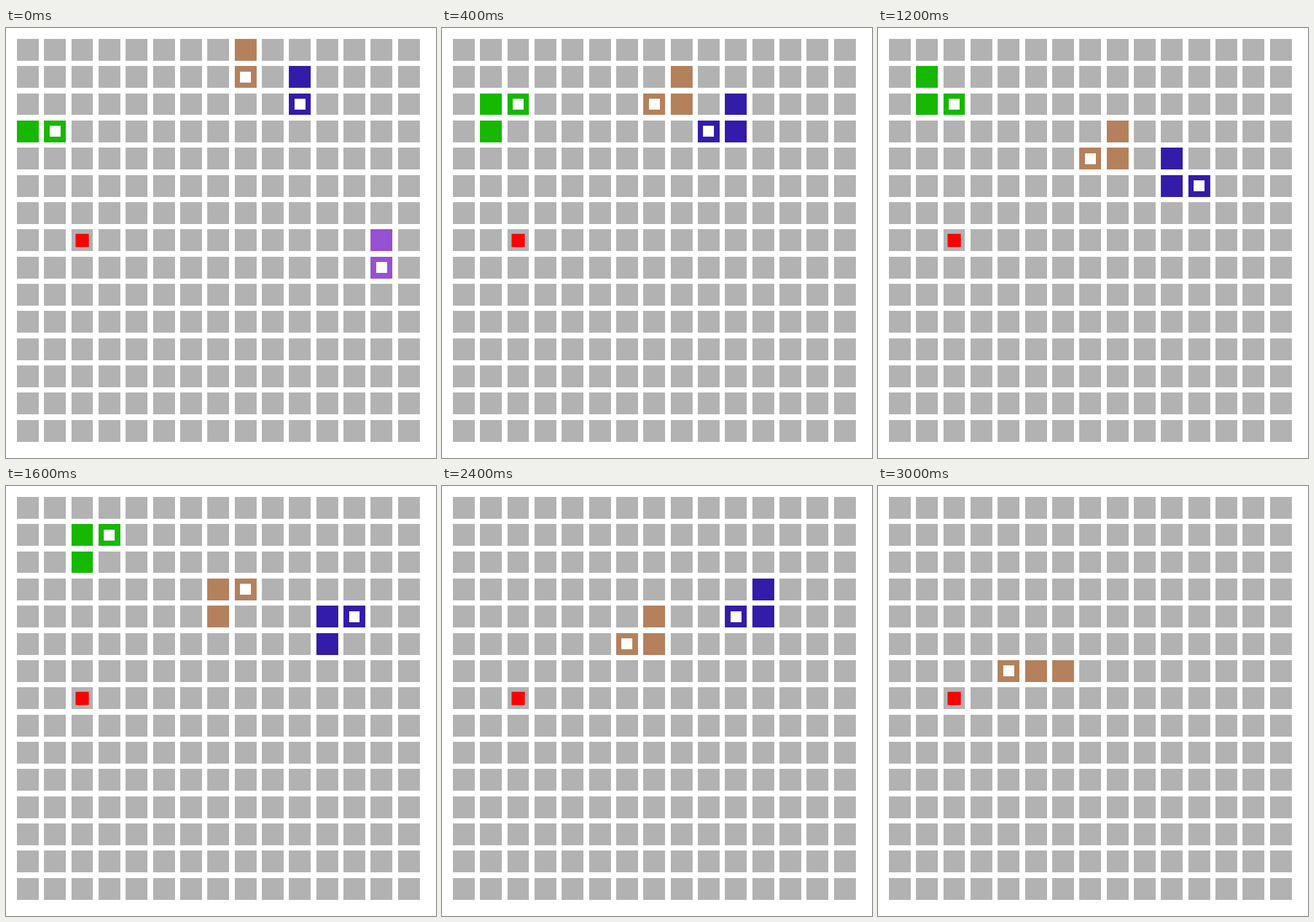
Animation of 748 by 748 pixels, one loop 3.2 s. Source, as an HTML page with a canvas:

```html
<!DOCTYPE html>
<html lang="en">
<head>
<meta charset="utf-8">
<title>Grid snakes</title>
<style>
  html, body { margin: 0; width: 100%; height: 100%; overflow: hidden; background: #fff; }
  canvas { display: block; }
</style>
</head>
<body>
<canvas id="stage" width="748" height="748"></canvas>
<script>
const ctx = document.getElementById('stage').getContext('2d');
const SIZE = 748, CELLS = 15, STEP = 200, STEPS = 16, LENGTH = 3;
const UNIT = SIZE / 79;
const FOOD = [2, 7];
const DIRS = { U: [0, -1], D: [0, 1], L: [-1, 0], R: [1, 0] };

// A snake leaves the board once its moves run out.
const snakes = [
  { color: '#16b800', start: [0, 3], moves: 'RURULDRURUR' },
  { color: '#b4815c', start: [8, 0], moves: 'DDLDRDLURDLDLDLL' },
  { color: '#331caa', start: [10, 1], moves: 'DDLDRDRURULDLDR' },
  { color: '#9751d3', start: [13, 7], moves: 'DR' }
];

for (const snake of snakes) {
  snake.path = [snake.start];
  for (const move of snake.moves) {
    const [x, y] = snake.path[snake.path.length - 1];
    const [dx, dy] = DIRS[move];
    snake.path.push([x + dx, y + dy]);
  }
}

// Square centred in a cell, side given in grid units, snapped to whole pixels.
function square([col, row], side, color) {
  const inset = (4 - side) / 2;
  const edge = n => Math.round((2 + 5 * n + inset) * UNIT);
  const end = n => Math.round((2 + 5 * n + inset + side) * UNIT);
  const x = edge(col), y = edge(row);
  ctx.fillStyle = color;
  ctx.fillRect(x, y, end(col) - x, end(row) - y);
}

function draw(step) {
  ctx.fillStyle = '#fff';
  ctx.fillRect(0, 0, SIZE, SIZE);
  for (let row = 0; row < CELLS; row++) {
    for (let col = 0; col < CELLS; col++) square([col, row], 4, '#b2b2b2');
  }
  square(FOOD, 2.4, '#f00');
  for (const { path, color } of snakes) {
    const head = step + 1;
    if (head >= path.length) continue;
    const body = path.slice(Math.max(0, head - LENGTH + 1), head + 1);
    for (const cell of body) square(cell, 4, color);
    square(path[head], 2, '#fff');
  }
}

let origin = null;
function tick(now) {
  if (origin === null) origin = now;
  draw(Math.floor((now - origin) / STEP) % STEPS);
  requestAnimationFrame(tick);
}

draw(0);
requestAnimationFrame(tick);
</script>
</body>
</html>
```
